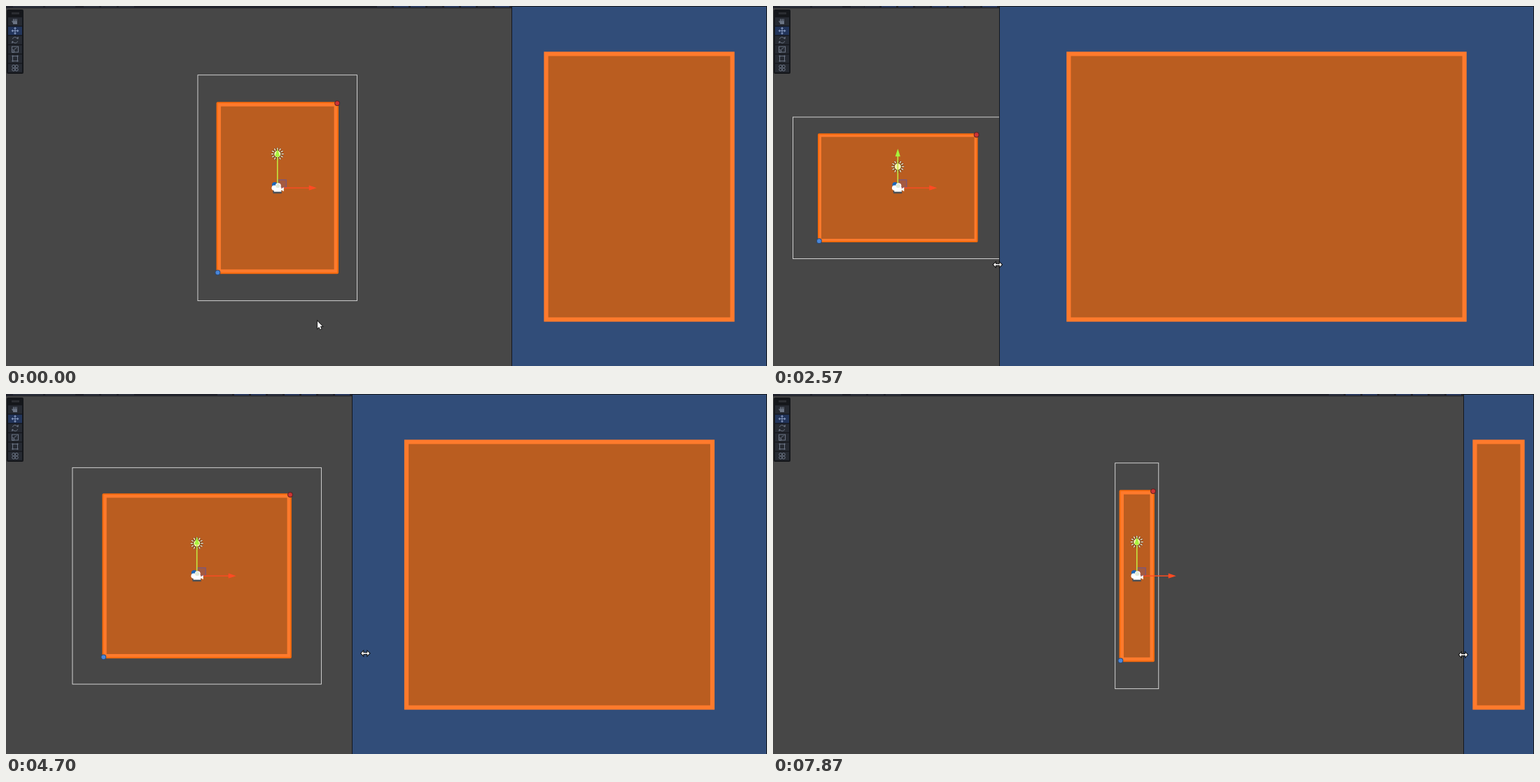
Recreate the animation shown at these times as an HTML page with a canvas. Size 1087 by 515 pixels, loop 8000 ms.

```html
<!DOCTYPE html>
<html lang="en">
<head>
<meta charset="utf-8">
<title>Resizing the game view</title>
<style>
  html, body { margin: 0; width: 100%; height: 100%; overflow: hidden; background: #474747; }
  canvas { display: block; }
</style>
</head>
<body>
<canvas id="stage" width="1087" height="515"></canvas>
<script>
const ctx = document.getElementById('stage').getContext('2d');
const WIDTH = 1087, HEIGHT = 515, LOOP = 8000, POINTER_LEAD = 50;
const ORANGE = '#ff7a2c', FILL = '#ba5d20', INK = '#6b7484';

// Drag turning points: time (ms), value
const dividerKeys = [[1050, 722], [1430, 661], [1830, 559], [2570, 323], [2670, 319], [3500, 199],
  [3730, 188], [3900, 188], [4030, 213], [4670, 482], [5430, 762], [5500, 790], [6370, 900.4], [7870, 986]];
const approachKeys = [[20, 445], [800, 722]];
const pointerYKeys = [[20, 451], [800, 396], [2570, 370], [7870, 373]];

// Monotone cubic curve through the keys
function follow(keys, t) {
  const last = keys.length - 1;
  if (t <= keys[0][0]) return keys[0][1];
  if (t >= keys[last][0]) return keys[last][1];
  const i = keys.findIndex(key => key[0] > t) - 1;
  const rate = n => (keys[n + 1][1] - keys[n][1]) / (keys[n + 1][0] - keys[n][0]);
  const slope = n => {
    if (n === 0 || n === last) return 0;
    const a = rate(n - 1), b = rate(n);
    return a * b > 0 ? 2 * a * b / (a + b) : 0;
  };
  const [t0, v0] = keys[i], [t1, v1] = keys[i + 1];
  const span = t1 - t0, u = (t - t0) / span, w = 1 - u;
  return w * w * ((1 + 2 * u) * v0 + u * span * slope(i)) +
         u * u * ((1 + 2 * w) * v1 - w * span * slope(i + 1));
}

function box(x, y, w, h, color) {
  ctx.fillStyle = color;
  ctx.fillRect(x, y, w, h);
}

function frame(cx, cy, w, h, color, width) {
  ctx.strokeStyle = color;
  ctx.lineWidth = width;
  ctx.strokeRect(cx - w / 2, cy - h / 2, w, h);
}

function line(color, width, ...points) {
  ctx.strokeStyle = color;
  ctx.lineWidth = width;
  ctx.beginPath();
  points.forEach(([x, y]) => ctx.lineTo(x, y));
  ctx.stroke();
}

function paint(color, outline) {
  if (outline) {
    ctx.strokeStyle = outline;
    ctx.lineWidth = 2;
    ctx.stroke();
  }
  ctx.fillStyle = color;
  ctx.fill();
}

function shape(color, outline, ...points) {
  ctx.beginPath();
  points.forEach(([x, y]) => ctx.lineTo(x, y));
  ctx.closePath();
  paint(color, outline);
}

function disc(x, y, r, color, outline) {
  ctx.beginPath();
  ctx.arc(x, y, r, 0, 7);
  paint(color, outline);
}

// Repeats a drawing around a point, turned by equal steps
function around(x, y, count, drawPart) {
  for (let i = 0; i < count; i++) {
    ctx.save();
    ctx.translate(x, y);
    ctx.rotate(i * 2 * Math.PI / count);
    drawPart();
    ctx.restore();
  }
}

function borderedRect(cx, cy, w, h, border) {
  const x = cx - w / 2, y = cy - h / 2;
  box(x, y, w, h, ORANGE);
  box(x + border, y + border, w - 2 * border, h - 2 * border, FILL);
}

function drawTopStrip(d) {
  box(0, 0, d, 3, '#20222b');
  box(0, 3, d, 1, '#3b3b3c');
  for (let x = 10; x < 100; x += 46) box(x, 0, 43, 2, '#2c303a');
  for (let x = 111; x < 180; x += 25) box(x, 0, 22, 2, '#2c303a');
  box(d - 193, 0, 193, 3, '#20222b');
  for (let i = 0; i < 8; i++) box(d - 192 + i * 24, 0, 21, 2, i % 3 ? '#2b3a5c' : '#2d3240');
}

function drawToolbar() {
  const x = 13, rowY = i => 22.2 + i * 13.3;
  ctx.beginPath();
  ctx.roundRect(1, 5, 24, 92, 2);
  paint('#15171b');
  box(8, 9, 11, 3, '#2a2c31');
  for (let i = 0; i < 6; i++) box(3, rowY(i) - 6, 20, 12, i === 1 ? '#22345a' : '#262a32');

  // Hand
  box(10, 21.5, 6, 4.5, INK);
  for (let i = 0; i < 4; i++) box(10 + i * 1.6, 18.5, 1, 4, INK);
  line(INK, 1.2, [8.5, 21.5], [11, 24.5]);

  // Move
  around(x, rowY(1), 4, () => {
    line('#8497bd', 1, [0, 0], [4, 0]);
    shape('#8497bd', null, [5.5, 0], [3, -2], [3, 2]);
  });

  // Rotate
  around(x, rowY(2), 2, () => {
    ctx.beginPath();
    ctx.arc(0, 0, 4, .4, 2.8);
    ctx.strokeStyle = INK;
    ctx.lineWidth = 1;
    ctx.stroke();
    shape(INK, null, [-2, 2.5], [-5, 2], [-4.5, 5]);
  });

  // Scale
  frame(x, 62, 9, 8, INK, 1);
  frame(x - 3, 64.5, 3, 3, INK, 1);
  line(INK, 1, [12, 62], [15.5, 59.5]);

  // Rect
  frame(x, 75.2, 7, 7, INK, 1);
  around(x, 75.2, 4, () => disc(3.5, 3.5, 1.1, INK));

  // Transform
  around(x, rowY(5), 4, () => {
    ctx.beginPath();
    ctx.arc(2.2, 2.2, 2.1, 0, 7);
    ctx.strokeStyle = INK;
    ctx.lineWidth = 1;
    ctx.stroke();
  });
}

function drawSun(x, y) {
  around(x, y, 12, () => {
    line('rgba(40,30,15,.5)', 2.4, [5, 0], [9.3, 0]);
    line('#fffbe8', 1.2, [5.5, 0], [9, 0]);
  });
  disc(x, y, 4.6, '#fbf0b0', 'rgba(70,55,25,.6)');
}

function drawCamera(x, y) {
  shape('#4b4f55', null, [x - 7, y + 4], [x + 6, y + 4], [x + 6, y + 8], [x - 6, y + 8]);
  disc(x - 4, y - 4.5, 3.8, '#1d66b5');
  disc(x - 4.5, y, 3.8, '#fff');
  disc(x + 1, y - 3, 4, '#fff');
  box(x - 5, y - 1, 10.5, 6.5, '#fff');
  shape('#fff', null, [x + 4, y + 2], [x + 9, y - 1], [x + 9, y + 5]);
  disc(x + .5, y - 3, 3, '#e2ead9');
}

function drawAxes(x, y) {
  box(x + 1, y - 12, 12, 11, 'rgba(80,80,190,.2)');
  frame(x + 6.5, y - 6, 12, 11, 'rgba(78,84,190,.6)', 1);
  line('#c3e640', 1.6, [x, y - 5], [x, y - 46]);
  shape('#a6f43c', null, [x, y - 56], [x - 3.6, y - 45], [x + 3.6, y - 45]);
  line('#f84d22', 1.6, [x + 9, y], [x + 46, y]);
  shape('#ff4b22', null, [x + 56, y], [x + 45, y - 3.6], [x + 45, y + 3.6]);
}

function drawSceneView(d) {
  const zoom = Math.min(1, d / HEIGHT), scale = .627 * zoom;
  const cx = d / 2 + 26.75 * zoom, cy = 260.2;
  const w = (WIDTH - 2 - d) * scale, h = HEIGHT * scale;
  const rw = w * .75, rh = h * .75;

  ctx.save();
  ctx.beginPath();
  ctx.rect(0, 0, d, HEIGHT);
  ctx.clip();
  box(0, 0, d, HEIGHT, '#474747');

  ctx.lineJoin = 'round';
  frame(cx, cy, rw, rh, '#f96a0c', 3.8);
  ctx.lineJoin = 'miter';
  borderedRect(cx, cy, rw, rh, 6.2 * scale + .6);
  frame(cx, cy, w, h, '#e8e8e8', .85);

  disc(cx + rw / 2, cy - rh / 2, 2.9, '#cf3434', '#5c2222');
  disc(cx - rw / 2, cy + rh / 2, 2.9, '#4a86d8', '#294a78');
  drawSun(cx, cy - 48.5 * zoom);
  drawAxes(cx, cy);
  drawCamera(cx, cy);
  drawTopStrip(d);
  drawToolbar();
  ctx.restore();
}

function drawGameView(d) {
  const w = WIDTH - 2 - d;
  box(d, 0, WIDTH - d, HEIGHT, '#15181e');
  box(d + 1, 1, w, HEIGHT, '#314d79');
  borderedRect(d + 1 + w / 2, 258.5, w * .75, HEIGHT * .75, 6.2);
}

function drawPointer(x, y, resizing) {
  if (resizing) {
    const arrow = [[6, 0], [3, -3], [3, -.6], [-.5, -.6], [-.5, .6], [3, .6], [3, 3]];
    around(x, y, 2, () => shape('#fff', '#111', ...arrow));
    box(x - 3, y - .6, 6, 1.2, '#fff');
  } else {
    ctx.save();
    ctx.translate(x, y);
    shape('#fff', '#222', [0, 0], [0, 10], [2.2, 8], [3.8, 11.5], [5.3, 10.8], [3.8, 7.3], [6.8, 7.1]);
    ctx.restore();
  }
}

function draw(now) {
  const t = now % LOOP;
  const divider = Math.round(follow(dividerKeys, t));
  const x = t < 900 ? follow(approachKeys, t) : follow(dividerKeys, t + POINTER_LEAD);
  drawGameView(divider);
  drawSceneView(divider);
  drawPointer(x, follow(pointerYKeys, t), x > 717 || t > 900);
  requestAnimationFrame(draw);
}
requestAnimationFrame(draw);
</script>
</body>
</html>
```
